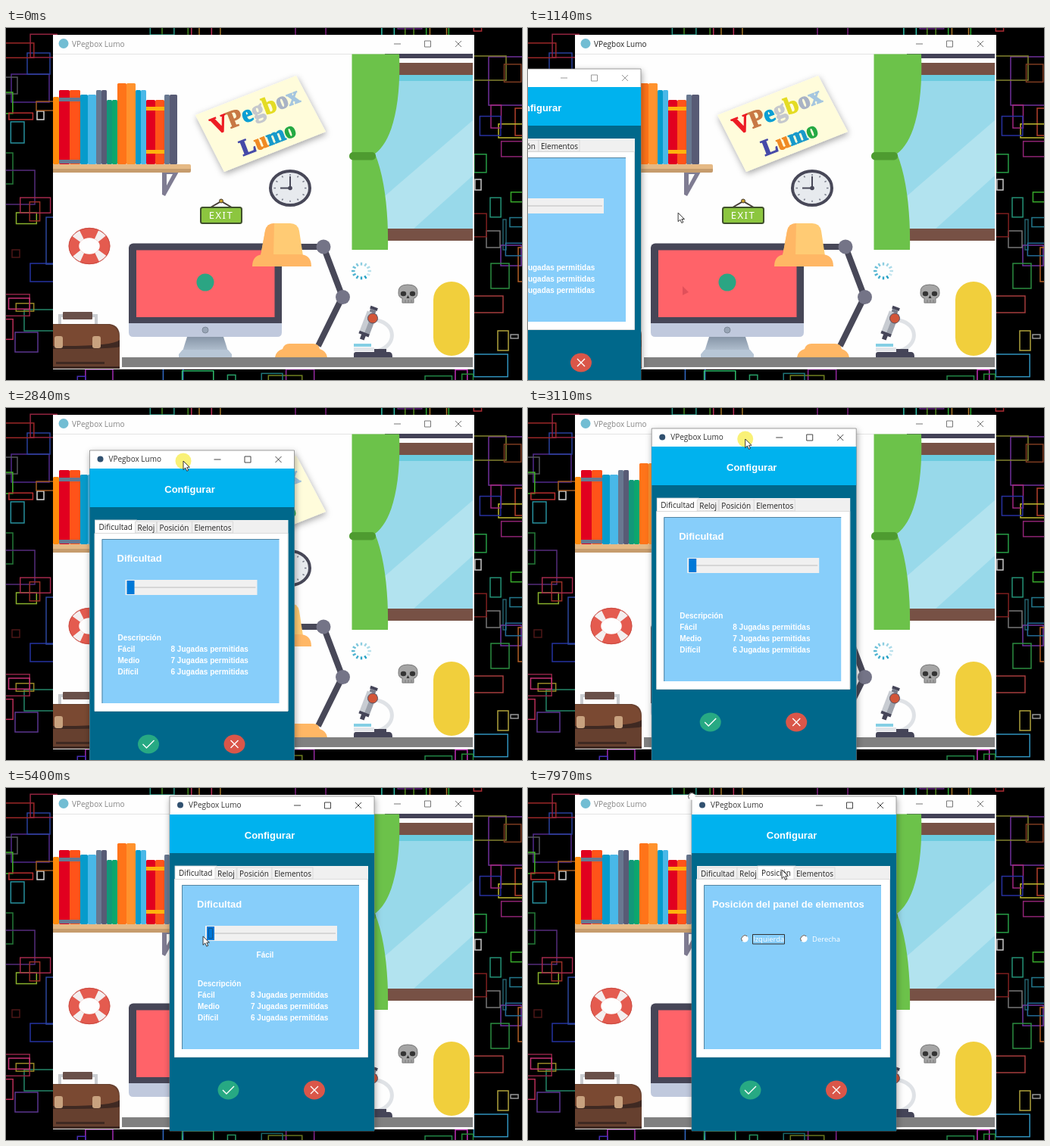
Recreate the animation shown at these times as an HTML page. Size 681 by 465 pixels, loop 8000 ms.

```html
<!DOCTYPE html>
<html lang="es">
<head>
<meta charset="utf-8">
<title>VPegbox Lumo</title>
<style>
html, body { margin: 0; width: 681px; height: 465px; overflow: hidden; background: #000; }
svg { display: block; }
.ui { font: 10px "Open Sans", "Noto Sans", sans-serif; }
.bold { font: bold 10px "Liberation Sans", Arial, sans-serif; fill: #fff; }
.head { font-size: 13px; }
.sign { font: bold 32px "Liberation Serif", serif; stroke-width: 1.3; }
.mark { fill: none; stroke: currentColor; }
</style>
</head>
<body>
<svg width="681" height="465" viewBox="0 0 681 465">
<defs>
  <clipPath id="inside"><path d="M62 9H618V451H62Z"/></clipPath>
  <filter id="soft" x="-20%" y="-20%" width="140%" height="140%"><feDropShadow dx="1" dy="3" stdDeviation="4" flood-opacity=".35"/></filter>
  <linearGradient id="metal" x2="0" y2="1"><stop stop-color="#8796a8"/><stop offset="1" stop-color="#b9c7d6"/></linearGradient>
  <g id="winButtons" class="mark">
    <path d="M0 .5h9M40.500-3.500h8v8h-8zM81-3.500l8 8m0-8l-8 8"/>
  </g>
</defs>
<g id="wall" fill="none" stroke-width="1.5"></g>

<g clip-path="url(#inside)">
  <path fill="#fefefe" d="M62 9H618V451H62Z"/>
  <path stroke="#e4e4e4" d="M62 34.500H618"/>
  <circle cx="76" cy="20.500" r="6.500" fill="#72bdd3"/>
  <text id="mainTitle" class="ui" x="87" y="24.500">VPegbox Lumo</text>
  <g id="mainButtons"><use href="#winButtons" x="512" y="20.500"/></g>

  <g id="books"></g>
  <path fill="#7f7c92" d="M206 190H228L210 222L206 220ZM212 193V208L220 193Z" fill-rule="evenodd"/>
  <path fill="#e5b985" d="M62 180H242Q244 180 244 182V187H62Z"/>
  <path fill="#c69c6d" d="M62 186H244V189Q244 191 242 191H62Z"/>

  <path filter="url(#soft)" fill="#fffcdb" d="M250 115L383 63L422 137L288 190Z"/>
  <g class="sign">
    <text id="signTop" transform="translate(275 141) rotate(-21)"></text>
    <text id="signLow" transform="translate(313 169) rotate(-21)" font-size="30"></text>
  </g>

  <ellipse cx="375" cy="211.500" rx="26" ry="22.500" fill="#e7eaee" stroke="#484858" stroke-width="4"/>
  <g id="ticks" stroke="#777b88" stroke-width="1.500"></g>
  <path d="M375 196V211.500H362" fill="none" stroke="#484858" stroke-width="2"/>
  <circle cx="375" cy="211.500" r="2.800" fill="#484858"/>

  <path d="M270 237L284 229L298 237" fill="none" stroke="#453d35" stroke-width="2"/>
  <circle cx="284" cy="228.500" r="2.500" fill="#c9a02a" stroke="#453d35"/>
  <rect x="257" y="237" width="54" height="21" rx="2.500" fill="#8cc63f" stroke="#40502c" stroke-width="2"/>
  <text x="284" y="252" text-anchor="middle" fill="#fff" style="font:13px 'Noto Sans',sans-serif;letter-spacing:1.500px">EXIT</text>

  <g>
    <path fill="#98d9ea" d="M486 62H616V266H486Z"/>
    <path fill="#b2e3ef" d="M616 122V195L537 266H500V222Z"/>
    <path fill="#6bcbdf" d="M500 62H616V70H500Z"/>
    <path fill="#434256" d="M500 34H616V40H500Z"/>
    <path fill="#775145" d="M500 46H616V62H500ZM490 265H616V281H490Z"/>
    <path fill="#6cc24a" d="M456.500 34.500H519C521 88 514 146 487 166C500 198 505 245 504 293H456.500Z"/>
    <rect x="453" y="164" width="35" height="10.500" rx="5" fill="#4e9b30"/>
  </g>

  <g fill="none" stroke-width="13.500">
    <ellipse cx="110" cy="288" rx="20.500" ry="17.500" stroke="#e45b4f"/>
    <ellipse cx="110" cy="288" rx="20.500" ry="17.500" stroke="#f4efef" pathLength="360" stroke-dasharray="28 62" stroke-dashoffset="-30"/>
    <ellipse cx="110" cy="288" rx="27" ry="23.500" stroke="#c94c43" stroke-width="1"/>
  </g>

  <rect x="162" y="284.500" width="202" height="112" rx="6" fill="#464657"/>
  <path fill="#ff6369" d="M172 293.500H354.500V382H172Z"/>
  <path fill="#c0c9dd" d="M162 390H364V402Q364 408 358 408H168Q162 408 162 402Z"/>
  <circle cx="263" cy="399" r="4" fill="#98a5b6" stroke="#7d8999"/>
  <path fill="url(#metal)" d="M239 408H287L294 430H232Z"/>
  <path fill="#b7c6d6" d="M233 425H293L298 431V435H228V431Z"/>
  <circle cx="263" cy="336" r="11.500" fill="#2ba583"/>
  <path id="trace" fill="#a82f40" opacity=".35" d="M204 341V353L212 349Z"/>

  <path d="M385 289H419L444 355L412 420" fill="none" stroke="#484858" stroke-width="8"/>
  <g fill="#747487"><circle cx="419" cy="289" r="9.500"/><circle cx="444.500" cy="355.500" r="9.500"/></g>
  <path fill="#ffb765" d="M355 435Q356 427 365 424Q367 417 374 417H405Q413 417 414 424Q423 427 424 435Z"/>
  <path fill="#ffcb74" d="M336 301L342 268Q344 258 354 258H375Q385 258 387 268L392 301Z"/>
  <path fill="#ffb765" d="M336 301L342 268Q344 258 354 258L353 301Z"/>
  <path fill="#ffb765" d="M325 315Q325 299 341 299H387Q403 299 403 315Z"/>

  <g id="spinner" stroke="#209fc4" stroke-width="2.400"></g>

  <g fill="#a5a5a5" stroke="#777">
    <path d="M518 350Q517 339 530 339Q544 339 543 350Q543 356 538 357V363H523V357Q518 356 518 350Z"/>
    <g fill="#343434" stroke="none"><ellipse cx="524.500" cy="351" rx="3.700" ry="3.300"/><ellipse cx="536.500" cy="351" rx="3.700" ry="3.300"/><path d="M530.500 353l2 4h-4z"/></g>
    <path d="M527 359v4m4-4v4m4-4v4"/>
  </g>

  <path fill="none" stroke="#dfe2e6" stroke-width="5" d="M490 386C516 392 515 419 492 426"/>
  <path fill="#454558" d="M459 435V431Q459 428 462 428H506Q510 428 510 435ZM486 424H502V429H486Z"/>
  <path fill="#84cfe4" d="M459 417H482V421H459Z"/>
  <path fill="#e1e4e8" d="M459 422H486V427H459Z"/>
  <g transform="translate(478 390) rotate(21)">
    <path fill="#c8ccd2" d="M-7-15H7V14H-7Z"/><path fill="#9da2ac" d="M0-15H7V14H0Z"/>
    <path fill="#454558" d="M-5-23H5V-19H-5ZM-7 13H7V17H-7ZM-3 17H3V23H-3Z"/><path fill="#777a88" d="M-4-19H4V-15H-4Z"/>
  </g>
  <circle cx="484" cy="383.500" r="6.500" fill="#d25538" stroke="#555061"/>

  <rect x="564" y="335" width="48" height="98" rx="24" fill="#f1cf3c"/>

  <path fill="none" stroke="#c9ccd0" stroke-width="4" d="M71 392V380H119V392"/>
  <rect x="75" y="375" width="39" height="10" rx="1" fill="#69504a"/>
  <path fill="#66402f" d="M62 391H137Q150 393 150 407V450H62Z"/>
  <path fill="#7a4932" d="M62 392H136Q149 395 150 412Q143 421 62 421Z"/>
  <path fill="#3f2922" d="M62 420Q140 421 150 412V421Q145 424 62 424ZM66 441H130V444H66ZM62 447H150V450H62Z"/>
  <g fill="#c8a27f"><rect x="64" y="407" width="11" height="16" rx="3"/><rect x="114" y="407" width="11" height="16" rx="3"/></g>

  <path fill="#808080" d="M153 435H616V448H153Z"/>
  <path fill="#e8e8e8" d="M62 450H618V451H62ZM616.500 34H618V451H616.500Z"/>
</g>

<g id="dialog">
  <path filter="url(#soft)" fill="#fff" stroke="#777" stroke-width=".7" d="M0 0H270V442H0Z"/>
  <circle cx="14" cy="11.500" r="4" fill="#315170"/>
  <text class="ui" x="25" y="15" fill="#333">VPegbox Lumo</text>
  <g id="dialogButtons"><use href="#winButtons" x="164" y="11.500"/></g>
  <path fill="#00688b" d="M0 24H270V442H0Z"/>
  <path fill="#00b2ee" d="M0 24H270V75H0Z"/>
  <text class="bold head" x="132" y="55.500" text-anchor="middle">Configurar</text>
  <path fill="#f0f0f0" d="M7 92H262V344H7Z"/>
  <path fill="#fff" stroke="#dcdcdc" d="M6.500 109.500H261.500V344.500H6.500Z"/>
  <g id="tabs" class="ui"></g>
  <path fill="#87cefa" d="M16 117H250V334H16Z"/>
  <path fill="none" stroke="#5485a2" d="M16.500 334V117.500H250"/>

  <g class="panel bold">
    <text class="head" x="36" y="146.500">Dificultad</text>
    <path fill="#f0f0f0" d="M47 171H221V191H47Z"/>
    <path stroke="#d6d6d6" stroke-width="2" d="M49 181H219"/>
    <path fill="#0078d7" d="M49 172H59V190H49Z"/>
    <path id="grip" fill="none" stroke="#14304a" stroke-dasharray="1 1" d="M51.500 174.500H56.500V187.500H51.500Z"/>
    <text id="level" x="126" y="212.500" text-anchor="middle">Fácil</text>
    <g id="notes"></g>
  </g>
  <g class="panel bold">
    <text class="head" x="36" y="146.500">Reloj</text>
    <g class="ui">
      <use href="#radio" x="51" y="188"/><text x="62" y="191.500">Sí</text>
      <use href="#radio" x="51" y="208"/><text x="62" y="211.500">No</text>
    </g>
  </g>
  <g class="panel bold">
    <text class="head" x="27" y="146.500">Posición del panel de elementos</text>
    <g class="ui" style="font-size:9.500px">
      <g id="radio"><circle cx="0" cy="0" r="4.700" fill="#fff"/><path d="M-3.300 3.300A4.700 4.700 0 0 1 3.300-3.300" fill="none" stroke="#555"/></g>
      <use href="#radio" x="70" y="188"/><use href="#radio" x="148" y="188"/>
      <text x="81" y="192">Izquierda</text><text x="159" y="192">Derecha</text>
      <path d="M80.500 182.500H122.500V195H80.500Z" fill="none" stroke="#333"/>
    </g>
  </g>

  <g fill="none" stroke="#fff" stroke-width="1.400">
    <ellipse cx="77.500" cy="388" rx="14" ry="12.500" fill="#27a983" stroke="none"/>
    <path d="M70 388L75 393L85 383"/>
    <ellipse cx="191" cy="388" rx="14" ry="12.500" fill="#da5649" stroke="none"/>
    <path d="M186 383L196 393M196 383L186 393"/>
  </g>
</g>

<g id="pointer">
  <circle id="press" r="10.500" fill="#f8ee55" opacity=".8"/>
  <path fill="#fff" stroke="#222" stroke-width=".9" d="M0 0V11.500L2.700 9L4.700 13.300L6.700 12.400L4.800 8.300H8.300Z"/>
</g>
</svg>

<script>
const $ = id => document.getElementById(id);
const make = (parent, tag, attrs, text = '') => {
  const el = document.createElementNS('http://www.w3.org/2000/svg', tag);
  for (const k in attrs) el.setAttribute(k, attrs[k]);
  el.textContent = text;
  parent.append(el);
  return el;
};
const rect = (parent, x, y, width, height, look) =>
  make(parent, 'rect', { x, y, width, height, ...look });
const range = n => [...Array(n).keys()];

// Wallpaper: scattered outlines
`7 61 50 37 #512a8c;28 33 30 28 #28409c;-5 65 20 22 #55575c;-9 165 18 41 #247a38;
41 110 9 11 #d8d8d8;40 97 30 12 #a05a22;8 293 10 10 #4c1717;32 311 34 24 #2433a0;
-20 188 58 45 #552c7c;53 250 20 62 #2b469c;12 402 30 26 #5b3690;24 372 45 28 #25866a;
637 38 50 64 #70309a;617 37 43 32 #828330;672 106 20 36 #b4402c;619 200 8 14 #c8c8c8;
656 253 4 40 #23606c;653 287 27 27 #7034a0;634 268 18 22 #777;640 311 24 33 #2b8d40;
649 400 14 26 #b0a33c;666 405 10 5 #999;610 354 46 22 #a53c3c;676 290 20 45 #b35f25`
  .split(';').forEach(row => {
    const [x, y, w, h, stroke] = row.trim().split(' ');
    rect($('wall'), x, y, w, h, { stroke });
  });
let seed = 11;
const rnd = n => (seed = seed * 16807 % 2147483647) / 2147483647 * n;
range(46).forEach(i => {
  const stroke = `hsl(${rnd(360)} 60% ${30 + rnd(18)}%)`;
  const x = i < 12 ? rnd(60) - 22 : i < 24 ? 612 + rnd(55) : rnd(660);
  const y = i < 24 ? rnd(440) : i % 2 ? rnd(10) - 12 : 448 + rnd(14);
  rect($('wall'), x, y, 10 + rnd(35), 8 + rnd(28), { stroke });
});

// Books: left edge, width, top, colour
[[62, 8, 91, '#ff8a0a'], [70, 14, 82, '#e1001f'], [84, 14, 82, '#ff5319'],
 [98, 10, 88, '#069bcb'], [108, 11, 88, '#49b8e8'], [119, 7, 82, '#687890'],
 [126, 7, 82, '#585b75'], [133, 7, 95, '#119879'], [140, 7, 95, '#0ca66d'],
 [147, 12, 73, '#ff7419'], [159, 12, 73, '#ff922d'], [171, 7, 82, '#069bcb'],
 [178, 7, 82, '#49b8e8'], [185, 12, 95, '#e1001f'], [197, 12, 95, '#ff5319'],
 [209, 7, 88, '#687890'], [216, 10, 88, '#585b75']]
  .forEach(([x, w, y, fill]) => rect($('books'), x, y, w, 180 - y, { fill, rx: 1.5 }));
[[70, 28, 92, '#687890'], [70, 28, 174, '#687890'], [185, 24, 104, '#ffb20e'], [185, 24, 161, '#ffb20e']]
  .forEach(([x, w, y, fill]) => rect($('books'), x, y, w, 5, { fill }));

const letters = (id, word, colors) => [...word].forEach((c, i) =>
  make($(id), 'tspan', { fill: colors[i], stroke: colors[i] }, c));
letters('signTop', 'VPegbox', ['#ed1c24', '#c87945', '#0a9fd4', '#c5c8cd', '#e4dc24', '#a9b3c5', '#a5c6df']);
letters('signLow', 'Lumo', ['#4549a8', '#f08a24', '#189acb', '#25a944']);

const spokes = (id, cx, cy, r1, r2, squash, look) => range(12).forEach(i => {
  const a = i * Math.PI / 6, c = Math.cos(a), s = Math.sin(a) * squash;
  make($(id), 'path', { d: `M${cx + r1 * c} ${cy + r1 * s}L${cx + r2 * c} ${cy + r2 * s}`, ...look(i) });
});
spokes('ticks', 375, 211.5, 19, 21.5, .86, () => ({}));
spokes('spinner', 469, 321, 8.5, 13, .87, i => ({ opacity: 1 - ((i + 10) % 12) * .07 }));

[['Descripción', ''], ['Fácil', 8], ['Medio', 7], ['Difícil', 6]].forEach(([name, n], i) => {
  const y = 250.5 + i * 15.2;
  make($('notes'), 'text', { x: 37, y }, name);
  if (n) make($('notes'), 'text', { x: 107, y }, n + ' Jugadas permitidas');
});

const tabs = [['Dificultad', 9, 51], ['Reloj', 60, 28], ['Posición', 89, 46], ['Elementos', 135, 54]]
  .map(([name, x, w]) => ({
    x, w,
    box: rect($('tabs'), x, 94, w, 15, { stroke: '#d5d5d5', 'stroke-width': .8 }),
    label: make($('tabs'), 'text', { x: x + 3, y: 105.5, fill: '#222' }, name)
  }));
const panels = document.querySelectorAll('.panel');

// Rows: time, x, y
const dialogPath = [[2380, -121, 54], [2460, -108, 54], [2840, 110.5, 56], [2950, 110.5, 56],
  [3150, 176, 20], [3240, 178, 17], [3310, 179, 15], [3569, 179, 15], [3570, 218.5, 14],
  [3620, 218.5, 14], [3720, 216, 11]];
const pointerPath = [[130, 300, 390], [260, 206, 341], [340, 206, 341], [590, 229, 282],
  [1060, 229, 282], [1540, 46, 58], [1600, 46, 58], [1770, 20, 58], [2379, 20, 58],
  ...dialogPath.map(([t, x, y]) => [t, x + 123.5, y + 14]),
  [3930, 340, 25], [4110, 348, 90], [4300, 270, 187], [4400, 270, 187], [4540, 326, 184],
  [4709, 326, 184], [4710, 327, 180], [4879, 327, 180], [5020, 260, 196], [5400, 260, 196],
  [6030, 289, 108], [6430, 289, 108], [6800, 330, 180], [7130, 325, 200], [7190, 325, 200],
  [7560, 336, 111], [7970, 335, 108]];

const at = (path, t) => {
  const i = path.findIndex(k => k[0] > t);
  if (i < 1) return path.at(i).slice(1);
  const [a, b] = [path[i - 1], path[i]], p = (t - a[0]) / (b[0] - a[0]);
  return [1, 2].map(j => a[j] + (b[j] - a[j]) * p);
};
const within = (t, a, b) => t >= a && t < b;
const show = (el, on) => { el.style.display = on ? '' : 'none'; };

function draw(t) {
  const [x, y] = at(dialogPath, t), [px, py] = at(pointerPath, t);
  const open = Math.min(1, Math.max(0, (t - 760) / 350));
  const s = .92 + .08 * open;
  $('dialog').setAttribute('transform',
    `translate(${x} ${y}) translate(135 216) scale(${s}) translate(-135 -216)`);
  $('dialog').setAttribute('opacity', open);
  $('pointer').setAttribute('transform', `translate(${px} ${py})`);
  show($('pointer'), t >= 130);
  show($('press'), within(t, 2440, 3720) || within(t, 4300, 4400) || within(t, 6350, 6430) || within(t, 7620, 7720));
  show($('trace'), within(t, 340, 2840));
  show($('level'), t >= 4300);
  show($('grip'), t >= 3570);
  $('mainTitle').setAttribute('fill', within(t, 130, 2440) ? '#222' : '#858585');
  $('mainButtons').style.color = within(t, 130, 900) ? '#333' : '#777';
  $('dialogButtons').style.color = t < 2440 ? '#999' : '#444';

  const active = t < 6350 ? 0 : t < 7620 ? 1 : 2;
  panels.forEach((p, i) => show(p, i === active));
  tabs.forEach(({ x, w, box, label }, i) => {
    const on = i === active ? 2 : 0;
    box.setAttribute('x', x - on);
    box.setAttribute('width', w + 2 * on);
    box.setAttribute('y', 94 - on);
    box.setAttribute('height', 15 + on * 1.2);
    box.setAttribute('fill', on ? '#fff' : '#f0f0f0');
    label.setAttribute('y', 105.5 - on / 2);
  });
}
const tick = () => { draw(performance.now() % 8000); requestAnimationFrame(tick); };
tick();
</script>
</body>
</html>
```
